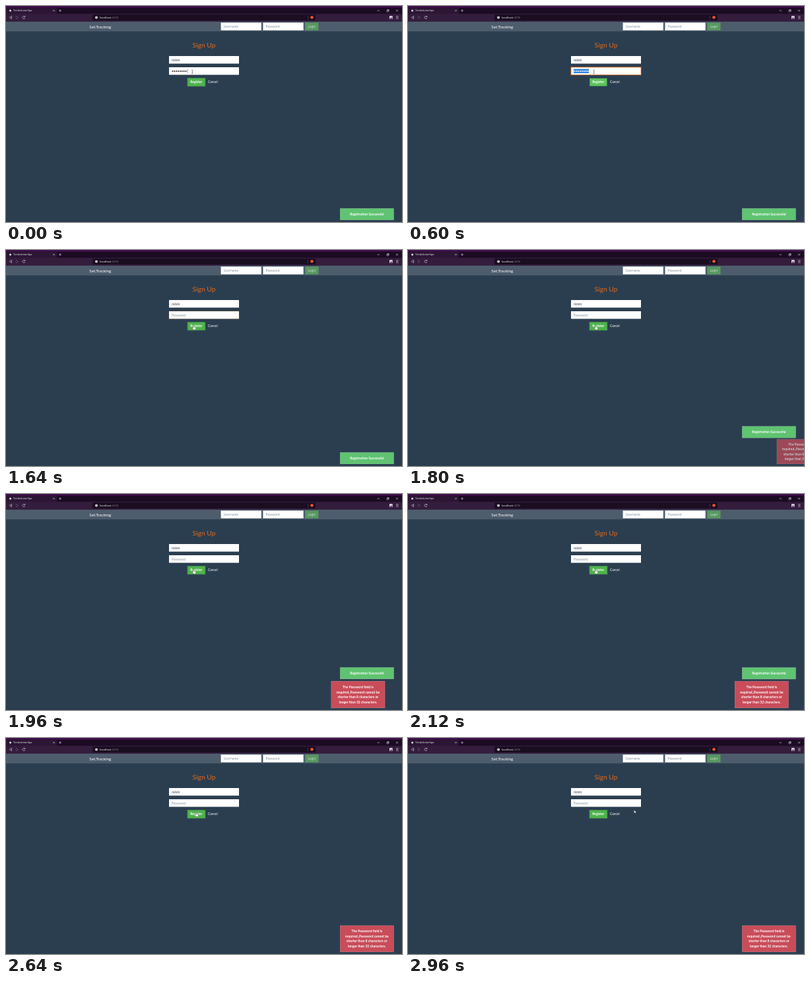
An HTML page for the animation above (3000 ms loop, 600x328 px).

```html
<!DOCTYPE html>
<html lang="en">
<head>
<meta charset="utf-8">
<title>Sign Up</title>
<style>
  html, body { margin: 0; width: 100%; height: 100%; overflow: hidden; background: #2b3e50; }
  svg { display: block; width: 100vw; height: 100vh; }
  text { font: 5px Lato, sans-serif; fill: #fff; }
  .ui { font: 3.75px "Open Sans", sans-serif; }
  .hint { fill: #8b95a0; }
  .bold { font-weight: 700; }
  .mid { text-anchor: middle; }
  .line { fill: none; stroke: #ddd5e2; stroke-width: .6; }
  .toast rect { stroke: rgba(255, 255, 255, .45); stroke-width: .4; }
  .cursor { fill: #fff; stroke: #111; stroke-width: .35; }
</style>
</head>
<body>
<svg viewBox="0 0 600 328" preserveAspectRatio="none">
  <rect width="600" height="328" fill="#2b3e50"/>

  <!-- Browser window -->
  <rect width="600" height="24" fill="#1b0b23"/>
  <rect width="600" height="2.5" fill="#43104f"/>
  <rect y="2.5" width="77" height="9.5" fill="#2c1635"/>
  <rect y="11.8" width="600" height="12" fill="#341c3d"/>
  <circle cx="6.5" cy="7" r="1.5" fill="#ddd"/>
  <text class="ui" x="11" y="8.4">TrinketListerSpa</text>
  <path class="line" d="M71.3 5.8l2.4 2.4m0-2.4l-2.4 2.4M80 7h4m-2-2v4M562.5 7h3.5M591 5.5l3 3m0-3l-3 3"/>
  <path class="line" d="M577 6.3h2.4v2.4h-2.4zM577.8 6.3v-.8h2.4v2.4h-.8"/>
  <path class="line" d="M8.6 15.2v4.4l-3.4-2.2z"/>
  <path class="line" d="M15.4 15.2v4.4l3.4-2.2z" opacity=".3"/>
  <path class="line" d="M28.6 16.2a2 2 0 1 0 .3 1.8M28.9 15v1.6h-1.6"/>
  <rect x="131" y="13" width="338" height="9" rx="1" fill="#1a0e20"/>
  <circle cx="137" cy="17.4" r="2" fill="#e8e2ec"/>
  <path d="M137 17v1.5M137 16v.5" stroke="#1a0e20" stroke-width=".6"/>
  <text class="ui" x="142" y="18.9" style="font-size:4.2px">localhost<tspan fill="#85798c">:4200</tspan></text>
  <path d="M457.5 15v5" stroke="#74667c" stroke-width=".4"/>
  <circle cx="463.5" cy="17.3" r="2.3" fill="#f0562c"/>
  <rect x="581" y="15" width="4.6" height="4.8" rx=".6" fill="#e8e2ec"/>
  <path d="M582 19.2a1.4 1.4 0 0 1 2.7 0zM583.3 16v1.2" stroke="#341c3d" stroke-width=".7" fill="#341c3d"/>
  <path class="line" d="M591 15.6h3.6m-3.6 1.8h3.6m-3.6 1.8h3.6"/>

  <!-- Navigation bar -->
  <rect y="23.7" width="600" height="14.8" fill="#4e5d6c"/>
  <text x="126.3" y="33.5" style="font-size:6.3px">Set.Tracking</text>
  <rect x="325.6" y="25.2" width="61.2" height="11.8" fill="#fff"/>
  <text class="hint" x="329.8" y="33">Username</text>
  <rect x="389.5" y="25.2" width="61.2" height="11.8" fill="#fff"/>
  <text class="hint" x="393.5" y="33">Password</text>
  <rect x="453.3" y="25.2" width="20.2" height="11.8" fill="#579861"/>
  <text class="mid" x="463.4" y="33" fill-opacity=".65">Login</text>

  <!-- Form -->
  <text class="mid" x="300" y="63.2" style="font-size:10.3px;fill:#df691a">Sign Up</text>
  <rect x="247" y="76" width="106" height="11.5" fill="#fff"/>
  <text x="251" y="83.6" style="fill:#2b3e50">rolvin</text>
  <rect id="passRing" x="246.8" y="92.8" width="106.4" height="11.9" fill="none" stroke="#df691a" stroke-width="1.1"/>
  <rect x="247" y="93" width="106" height="11.5" fill="#fff"/>
  <rect id="passEdge" x="247.1" y="93.1" width="105.8" height="11.3" fill="none" stroke="#df691a" stroke-width=".5"/>
  <rect id="selection" x="251" y="95.6" width="23" height="6.4" fill="#2f86e4"/>
  <g id="dots"></g>
  <text id="passHint" class="hint" x="251" y="100.7">Password</text>
  <rect id="caret" y="95.6" width=".45" height="6.2" fill="#222"/>
  <rect id="buttonRing" x="274.6" y="109.1" width="27.7" height="13.2" fill="#43804f"/>
  <rect id="button" x="275.3" y="109.8" width="26.2" height="11.8"/>
  <text class="mid bold" x="288.3" y="117.4">Register</text>
  <text x="305.9" y="117.4">Cancel</text>

  <!-- Notifications -->
  <g id="success" class="toast">
    <rect width="81.25" fill="#5fc371"/>
    <text class="mid bold" x="40.6">Registration Successful</text>
  </g>
  <g id="error" class="toast">
    <rect width="81.25" fill="#c94c59"/>
    <text class="mid bold" x="40.6">The Password field is</text>
    <text class="mid bold" x="40.6">required.,Password cannot be</text>
    <text class="mid bold" x="40.6">shorter than 8 characters or</text>
    <text class="mid bold" x="40.6">longer than 32 characters.</text>
  </g>

  <g id="pointer">
    <path id="beam" d="M-1.1-2.6h.8l.3.3.3-.3h.8M0-2.3v4.6M-1.1 2.6h.8l.3-.3.3.3h.8" fill="none" stroke="#222" stroke-width=".5"/>
    <path id="arrow" class="cursor" d="M0 0v5l1.2-1 .8 1.8.8-.4-.8-1.7h1.6z"/>
    <path id="hand" class="cursor" d="M-.6.3q.6-.6 1.2 0v2.4l2.6.6q.7.3.6 1l-.4 2.7h-3.4l-2-2.6q0-.9.8-.6l.6.5z"/>
  </g>
</svg>
<script>
const LOOP = 3000, SCALE = 0.3125, BOTTOM = 324.9;
const FOCUS = 20, SELECT = 360, CLEAR = 840, CLICK = 1520, ERROR_IN = 1706, SUCCESS_OUT = 2570;
const $ = id => document.getElementById(id);
const set = (el, attrs) => { for (const k in attrs) el.setAttribute(k, attrs[k]); };
const show = (id, on) => set($(id), { opacity: +on });
const clamp = v => Math.min(1, Math.max(0, v));
const smooth = v => v * v * (3 - 2 * v);

for (let i = 0; i < 8; i++) {
  const dot = document.createElementNS('http://www.w3.org/2000/svg', 'circle');
  set(dot, { cx: 252.4 + i * 2.87, cy: 99, r: 1 });
  $('dots').append(dot);
}

const bezier = (s, a, b) => 3 * (1 - s) ** 2 * s * a + 3 * (1 - s) * s * s * b + s ** 3;

// cubic-bezier(.175, .885, .32, 1.275) over half a second
function backOut(ms) {
  const x = clamp(ms / 500);
  let lo = 0, hi = 1;
  for (let i = 0; i < 24; i++) {
    const s = (lo + hi) / 2;
    if (bezier(s, .175, .32) < x) lo = s; else hi = s;
  }
  return bezier(hi, .885, 1.275);
}

// Places a toast above the given bottom edge; p is 0 hidden, 1 shown. Returns its outer top.
function placeToast(id, p, bottom) {
  const [box, ...lines] = $(id).children;
  const height = (lines.length * 24 + 2 + 30 * p) * SCALE;
  set($(id), {
    transform: `translate(${696.9 - 190.65 * p} ${bottom - height})`,
    opacity: clamp(p)
  });
  set(box, { height: Math.max(0, height) });
  lines.forEach((line, i) => set(line, { y: height / 2 + 1.7 + (i - (lines.length - 1) / 2) * 7.5 }));
  return bottom - height - 10 * SCALE * p;
}

// time, x, y
const path = [
  [0, 282.3, 100], [360, 281.6, 100], [960, 281.6, 100], [1240, 277.6, 107.3],
  [1480, 284, 114.2], [2600, 284, 114.2], [2780, 313, 102], [2960, 342.5, 109.3], [3000, 342.5, 109.3]
];

function pointerAt(t) {
  const i = path.findIndex(p => p[0] > t);
  const [t0, x0, y0] = path[i - 1], [t1, x1, y1] = path[i];
  const k = smooth((t - t0) / (t1 - t0));
  return [x0 + (x1 - x0) * k, y0 + (y1 - y0) * k];
}

function draw(t) {
  const passFocus = t < CLICK ? clamp((t - FOCUS) / 140) : 1 - clamp((t - CLICK) / 150);
  const filled = t < CLEAR, selected = t >= SELECT && filled;
  set($('passRing'), { opacity: passFocus * .55 });
  set($('passEdge'), { opacity: passFocus });
  show('selection', selected);
  show('dots', filled);
  set($('dots'), { fill: selected ? '#fff' : '#222' });
  show('passHint', !filled);
  show('caret', t < SELECT || (t >= CLEAR && t < CLEAR + 500));
  set($('caret'), { x: filled ? 274.8 : 250.9 });

  const [x, y] = pointerAt(t);
  const overInput = y > 93 && y < 104.5;
  const overButton = y > 109.8 && x > 275 && x < 301.5;
  show('beam', overInput);
  show('hand', overButton);
  show('arrow', !overInput && !overButton);
  set($('pointer'), { transform: `translate(${x} ${y})` });

  const buttonFocus = 1 - passFocus;
  set($('buttonRing'), { opacity: buttonFocus });
  set($('button'), { fill: overButton || buttonFocus > .5 ? '#4fb34c' : '#5cc35b' });

  let bottom = BOTTOM;
  show('error', false);
  if (t >= ERROR_IN) bottom = placeToast('error', backOut(t - ERROR_IN), bottom);
  placeToast('success', 1 - backOut(t - SUCCESS_OUT), bottom);
}

function tick() {
  draw(performance.now() % LOOP);
  requestAnimationFrame(tick);
}
tick();
</script>
</body>
</html>
```
